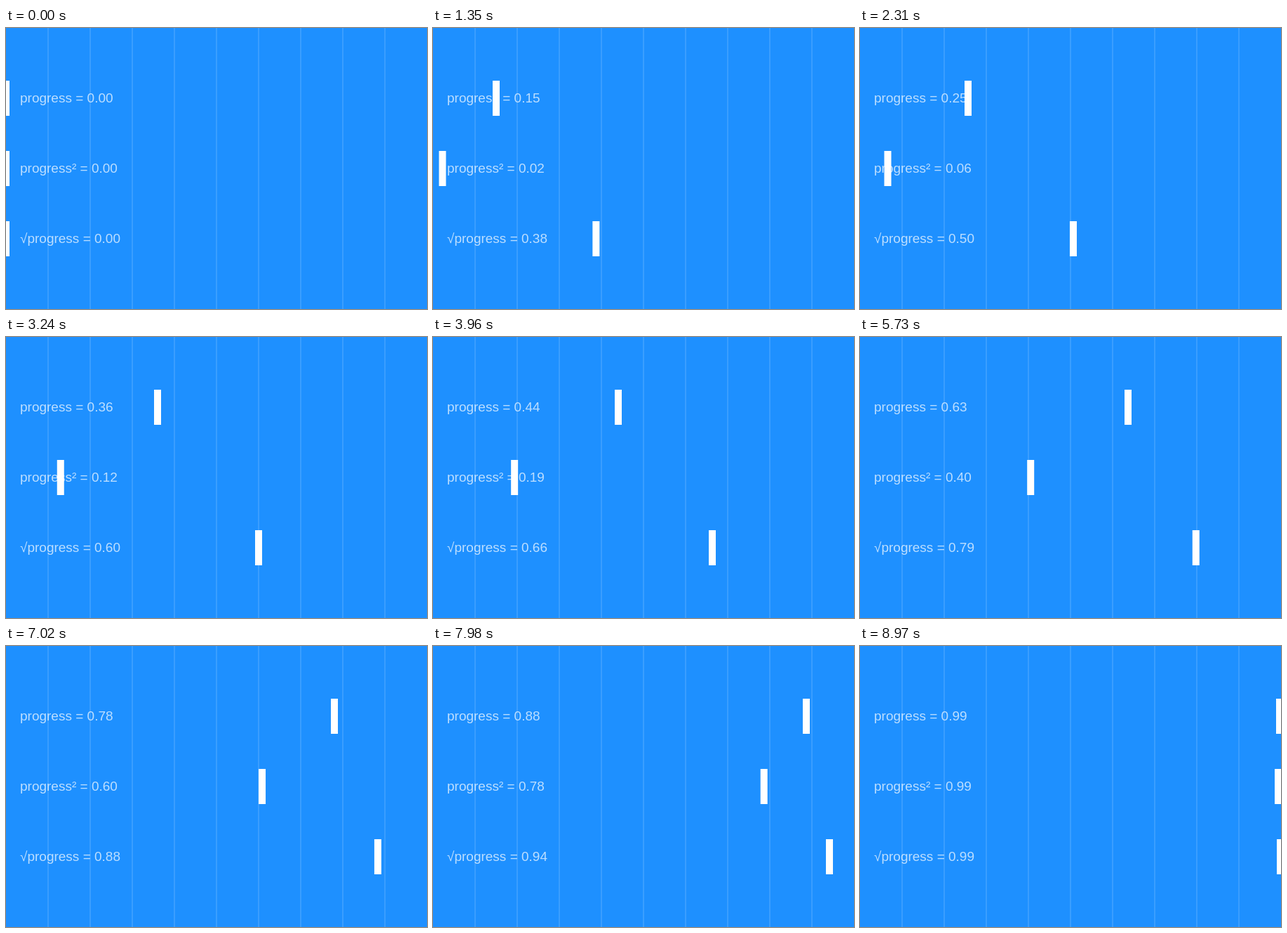
Recreate the animation shown at these times as an HTML page with a canvas. Size 600 px wide and 400 px high, loop 9 s.

```html
<!DOCTYPE html>
<html lang="en">
<head>
<meta charset="utf-8">
<title>Progress curves</title>
<style>
  html, body { margin: 0; width: 100%; height: 100%; overflow: hidden; background: #1e90ff; }
  canvas { display: block; }
</style>
</head>
<body>
<canvas id="stage" width="600" height="400"></canvas>
<script>
const ctx = document.getElementById('stage').getContext('2d');
const W = 600, H = 400, LOOP = 9000, STEP = 30;

const rows = [
  { label: 'progress', y: 100, curve: p => p },
  { label: 'progress²', y: 200, curve: p => p * p },
  { label: '√progress', y: 300, curve: Math.sqrt }
];

// Two decimals, cut off rather than rounded
const cut = v => (Math.floor(v * 100 + 1e-9) / 100).toFixed(2);

function drawGrid() {
  ctx.strokeStyle = 'rgba(255, 255, 255, 0.25)';
  ctx.lineWidth = 1;
  ctx.beginPath();
  for (let x = 60; x < W; x += 60) {
    ctx.moveTo(x, 0);
    ctx.lineTo(x, H);
  }
  ctx.stroke();
}

function drawRow({ label, y, curve }, progress) {
  const value = curve(progress);
  ctx.fillStyle = 'rgba(255, 255, 255, 0.7)';
  ctx.fillText(`${label} = ${cut(value)}`, 20, y + 6);
  ctx.fillStyle = '#fff';
  ctx.fillRect(value * W - 5, y - 25, 10, 50);
}

function draw(time) {
  const progress = Math.floor((time % LOOP) / STEP) * STEP / LOOP;
  ctx.fillStyle = '#1e90ff';
  ctx.fillRect(0, 0, W, H);
  drawGrid();
  ctx.font = '19px "Liberation Sans", Helvetica, Arial, sans-serif';
  for (const row of rows) drawRow(row, progress);
}

const start = performance.now();
function tick() {
  draw(performance.now() - start);
  requestAnimationFrame(tick);
}
tick();
</script>
</body>
</html>
```
